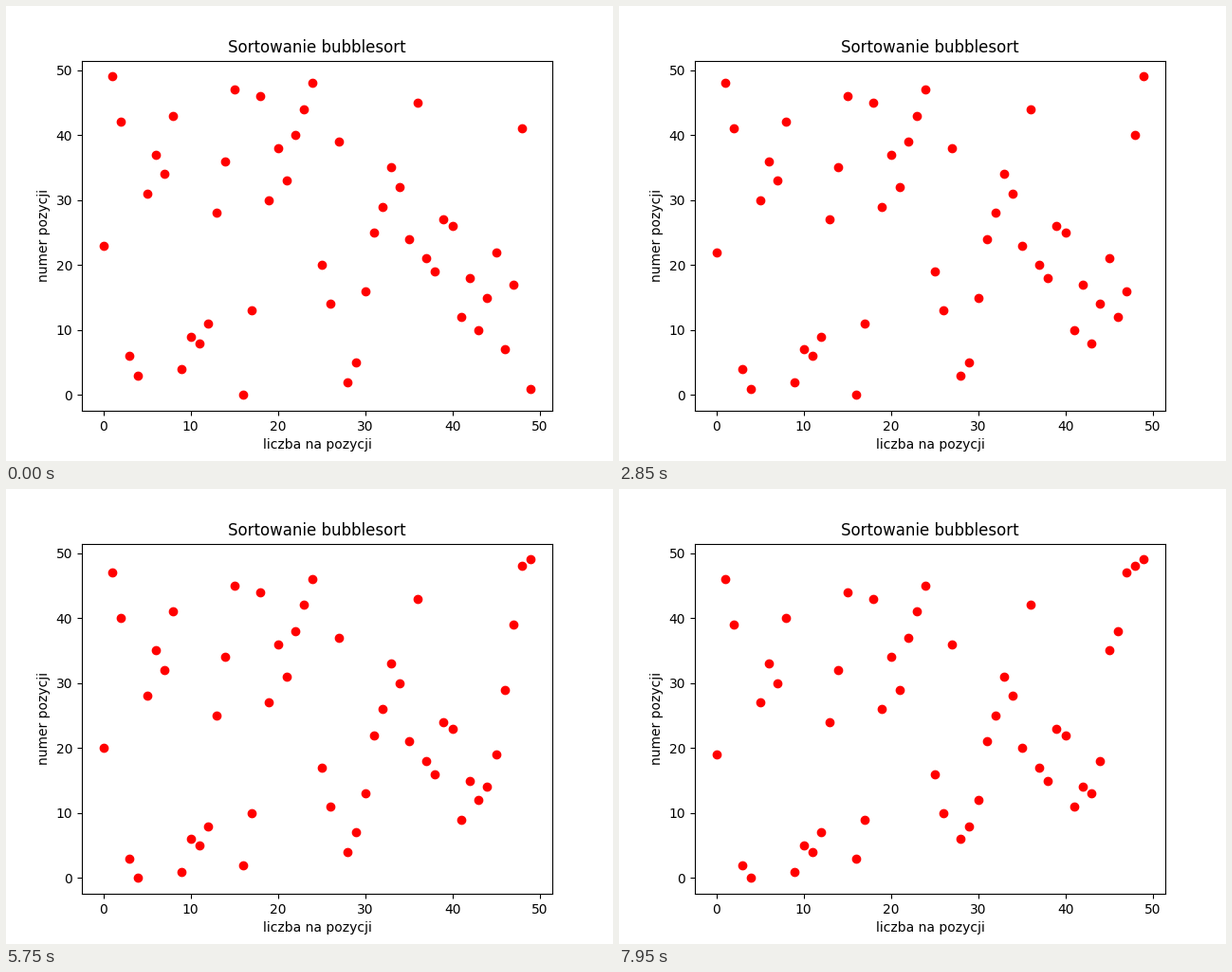
These frames come from a looping animation (640x480 px, 8000 ms). A matplotlib script:

```python
from itertools import islice

import matplotlib.pyplot as plt
from matplotlib.animation import FuncAnimation

FRAMES = 160
INTERVAL = 50

# The shuffled input; everything after it follows from the sort.
SHUFFLED = [16, 49, 28, 4, 9, 29, 3, 46, 11, 10, 43, 12, 41, 17, 26, 44, 30,
            47, 42, 38, 25, 37, 45, 0, 35, 31, 40, 39, 13, 32, 19, 5, 34, 21,
            7, 33, 14, 6, 20, 27, 22, 48, 2, 8, 23, 36, 18, 15, 24, 1]


def bubble_states(values):
    """Yield the list at the start and after every swap."""
    a = list(values)
    yield a[:]
    for end in range(len(a) - 1, 0, -1):
        for j in range(end):
            if a[j] > a[j + 1]:
                a[j], a[j + 1] = a[j + 1], a[j]
                yield a[:]


states = list(islice(bubble_states(SHUFFLED), FRAMES))

fig, ax = plt.subplots(figsize=(6.4, 4.8), dpi=100)
dots, = ax.plot(SHUFFLED, range(len(SHUFFLED)), "ro")
ax.set_title("Sortowanie bubblesort")
ax.set_xlabel("liczba na pozycji")
ax.set_ylabel("numer pozycji")


def update(i):
    dots.set_xdata(states[i])
    return dots,


anim = FuncAnimation(fig, update, frames=FRAMES, interval=INTERVAL,
                     repeat=True, repeat_delay=0)
plt.show()
```
